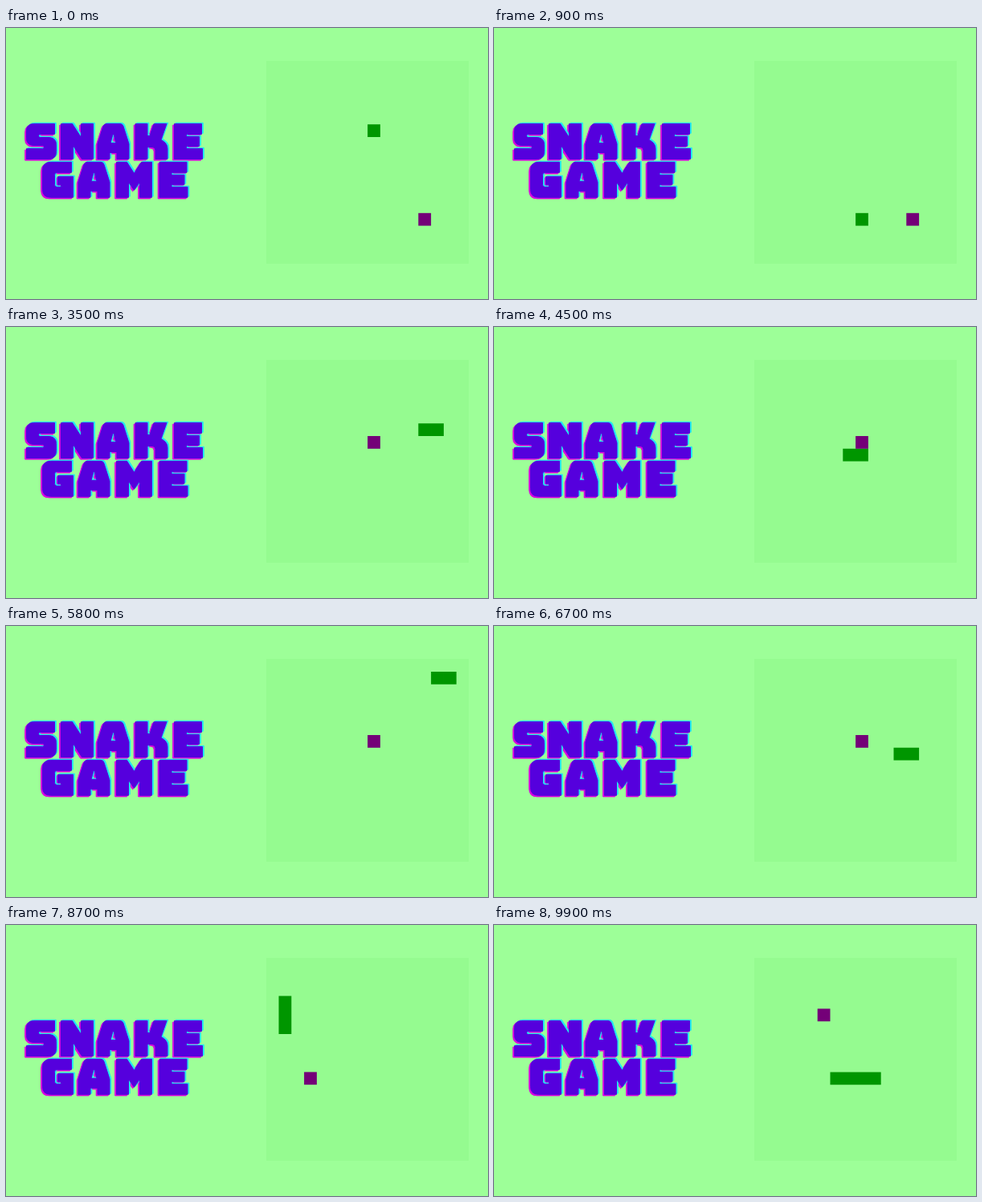
Write an HTML page with a canvas that moves like this. It is 600 by 338 pixels and loops after 10 s.

```html
<!DOCTYPE html>
<html lang="en">
<head>
<meta charset="utf-8">
<title>Snake Game</title>
<style>
html, body { margin: 0; width: 100%; height: 100%; overflow: hidden; background: #9dff98; }
canvas { display: block; width: 600px; height: 338px; }
</style>
</head>
<body>
<canvas id="stage" width="600" height="338" role="img" aria-label="Snake Game"></canvas>
<script>
const ctx = document.getElementById('stage').getContext('2d');
const TICK = 100, TICKS = 100, CELL = 15.8, LEFT = 323.7, TOP = 41.2;

// Corners of the snake's route, one cell per tick
const corners = '8,5 7,5 7,12 14,12 14,9 7,9 7,5 14,5 14,7 7,7 7,1 14,1 14,7 8,7 8,1 1,1 1,9 9,9'
  .split(' ').map(p => p.split(',').map(Number));

const route = [corners[0]];
for (const [cx, cy] of corners.slice(1)) {
  let [x, y] = route[route.length - 1];
  while (x !== cx || y !== cy) {
    x += Math.sign(cx - x);
    y += Math.sign(cy - y);
    route.push([x, y]);
  }
}

// Food cell and the tick at which it is eaten
const meals = [
  { cell: [12, 12], eaten: 13 },
  { cell: [8, 6], eaten: 71 },
  { cell: [3, 9], eaten: 93 },
  { cell: [5, 4], eaten: Infinity }
];

// Block letters, 44 units tall
const glyphs = {
  S: 'M9 0H35V13H17Q15 13 15 15T17 17H29Q37 18 37 26V35Q37 44 28 44H0V31H20Q22 31 22 29T20 27H8Q0 26 0 18V9Q0 0 9 0Z',
  N: 'M0 0H14L25 17V0H40V44H26L15 27V44H0Z',
  A: 'M11 0H28Q31 0 32 3L39 25V44H24V36H15V44H0V25L7 3Q8 0 11 0ZM19 13L16 24H23L20 13Z',
  K: 'M0 0H15V15H18L23 0H39L32 20Q40 24 40 31V44H25V33Q25 29 21 29H15V44H0Z',
  E: 'M0 0H34V13H15V16H31V28H15V31H35V44H0Z',
  G: 'M10 0H36V13H18Q15 13 15 16V28Q15 31 18 31H23V28H19V18H38V44H10Q0 44 0 34V10Q0 0 10 0Z',
  M: 'M0 0H13L22 14L31 0H44V44H29V25L22 35L15 25V44H0Z'
};
for (const k in glyphs) glyphs[k] = new Path2D(glyphs[k]);

const title = [
  { word: 'SNAKE', y: 119.5, xs: [25.5, 68.5, 114, 161, 209.5] },
  { word: 'GAME', y: 167.3, xs: [45.5, 90, 137.5, 191] }
];

function drawTitle(dx, dy, color) {
  ctx.fillStyle = ctx.strokeStyle = color;
  ctx.lineWidth = 1;
  ctx.lineJoin = 'round';
  for (const { word, y, xs } of title) {
    xs.forEach((x, i) => {
      ctx.save();
      ctx.translate(x + dx, y + dy);
      ctx.fill(glyphs[word[i]], 'evenodd');
      ctx.stroke(glyphs[word[i]]);
      ctx.restore();
    });
  }
}

function drawCells(cells, color) {
  ctx.fillStyle = color;
  ctx.beginPath();
  for (const [col, row] of cells) ctx.rect(LEFT + col * CELL, TOP + row * CELL, CELL, CELL);
  ctx.fill();
}

function draw(now) {
  const tick = Math.floor(now / TICK) % TICKS;
  const eaten = meals.filter(m => m.eaten < tick).length;

  ctx.fillStyle = '#9dff98';
  ctx.fillRect(0, 0, 600, 338);
  drawTitle(-1.8, 1.6, '#d800e0');
  drawTitle(1.8, -1.2, '#20e8f0');
  drawTitle(0, 0, '#5500dd');

  ctx.fillStyle = '#95fb90';
  ctx.fillRect(324, 41, 252, 253);
  drawCells(route.slice(Math.max(0, tick - eaten), tick + 1), '#009600');
  drawCells([meals[eaten].cell], '#740078');
}

function loop(now) {
  draw(now);
  requestAnimationFrame(loop);
}
draw(0);
requestAnimationFrame(loop);
</script>
</body>
</html>
```
